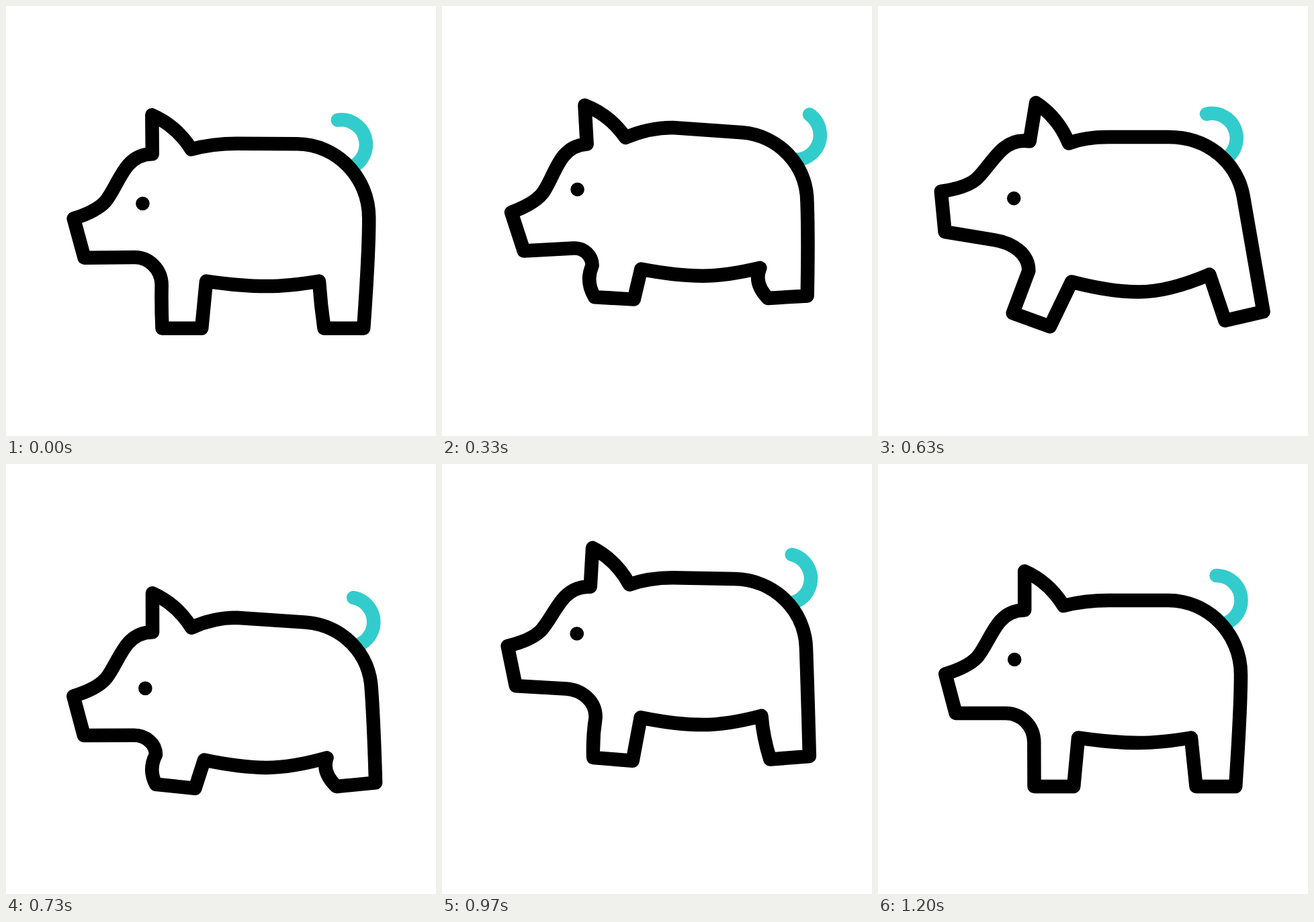
An HTML page that plays this animation: 640x640 px, repeating every 1670 ms.

```html
<!DOCTYPE html>
<html lang="en">
<head>
<meta charset="utf-8">
<title>Jumping pig</title>
<style>
  html, body { margin: 0; width: 100%; height: 100%; overflow: hidden; background: #fff; }
  svg { display: block; width: 100%; height: 100%; }
  path { fill: none; stroke-width: 20.5; stroke-linecap: round; stroke-linejoin: round; }
  #tail { stroke: #33cccc; }
  #body { stroke: #000; fill: #fff; }
</style>
</head>
<body>
<svg viewBox="0 0 640 640">
  <path id="tail" d="M-16.5-71A37 37 0 0 1 20.5-34A37 37 0 0 1 0-1"/>
  <path id="body"/>
  <circle id="eye" r="10.3"/>
</svg>
<script>
const LOOP = 1670, STEP = 1000 / 30;

// Turning points [step, value] of each movement; sine easing joins them.
const MOVES = {
  drop: [[-1, 0], [5.4, 40], [14.5, -67.5], [22.6, 34], [30, -35], [36, 0]],
  nod: [[-1, 0], [5.2, -8], [18.8, 9.4], [23.5, -3], [31.5, 5], [36, 0]],
  bend: [[-1, 0], [5.2, 16.7], [19, 0], [23, 13.5], [31.7, 0]],
  stride: [[5.2, 0], [19, 13], [23.5, 3], [31, 4.8], [36, 0]],
  wag: [[-2, 0], [2, -16], [9.5, 36], [14.5, -15], [18, -14], [25.5, 31], [32, 0]],
  gaze: [[0, 0], [13, -8], [19.5, 14.5], [27, -3], [36, 0]]
};

const rad = deg => deg * Math.PI / 180;
const el = id => document.getElementById(id);
const tail = el('tail'), body = el('body'), eye = el('eye');

function wave(points, n) {
  const i = points.findIndex(([t]) => t > n);
  if (i < 0) return points[points.length - 1][1];
  if (i === 0) return points[0][1];
  const [t0, a] = points[i - 1], [t1, b] = points[i];
  return a + (b - a) * (1 - Math.cos(Math.PI * (n - t0) / (t1 - t0))) / 2;
}

// Head coordinates are measured from the foot of the ear.
function headFrame({ drop, nod }) {
  const x0 = 218.2 + .8 * nod, y0 = 217.5 + drop - .88 * nod;
  const cos = Math.cos(rad(nod)), sin = Math.sin(rad(nod));
  return (x, y) => [x0 + x * cos - y * sin, y0 + x * sin + y * cos];
}

function outline(pose, at) {
  const { drop, nod, bend, stride } = pose;
  const reach = .75 * stride + .06 * stride * stride;
  const sole = ([x, y], a) => [x + 58.7 * Math.cos(rad(a)), y + 58.7 * Math.sin(rad(a))];
  const knee = (p, q, k) => [(p[0] + q[0]) / 2 - k, (p[1] + q[1]) / 2];

  const hipY = 203 + drop, shoulderY = hipY - .6 * bend;
  const hip = [432 + 1.2 * bend, hipY];
  const rump = [540 + .3 * stride + .2 * bend, hipY + 110 - 1.6 * stride];

  // Bent knees shorten the legs; hooves never sink below the ground.
  const hoofY = Math.min(480, 480 + drop - 2.4 * bend - .3 * stride);
  const hind = [473.5 + 3.3 * stride, hoofY], heel = sole(hind, -stride);
  const fore = [232.5 - 1.6 * reach, hoofY - .55 * reach], toe = sole(fore, reach);

  const groinY = 407.5 + drop - .25 * bend;
  const rear = [466 + 2.1 * stride, groinY];
  const front = [298 - .5 * reach, groinY + .55 * reach];
  const belly = [388, (rear[1] + front[1]) / 2 + 7.5 + stride];
  const toBelly = p => [belly[0] + .42 * (p[0] - belly[0]), belly[1]];

  const chest = [232.3 - .6 * bend - .4 * reach, 414 + drop - .9 * bend - .6 * reach];
  const jaw = at(-28, 153.5);
  const throat = at(-28 + .55 * (chest[0] - jaw[0]), 153.5);
  const lean = Math.max(0, heel[0] - rump[0]) / 170;
  const curve = .55 * (rump[1] - hipY);

  return [
    'M', at(-118, 95),
    'C', at(-100, 89.5), at(-82, 82), at(-71, 70.5),
    'C', at(-60, 59), at(-49, 30), at(-36, 16),
    'C', at(-27, 6), at(-15, 0), at(0, 0),
    'L', at(0, -58),
    'Q', at(36, -42), at(58, -6.5),
    'Q', [308, shoulderY], [343, shoulderY],
    'L', hip,
    'C', [hip[0] + .55 * (rump[0] - hip[0]), hipY + .36 * bend],
    [rump[0] - lean * curve, rump[1] - curve], rump,
    'Q', [rump[0] + lean * 50 + .15 * bend, rump[1] + 50], heel,
    'L', hind,
    'Q', knee(hind, rear, bend * 1.3), rear,
    'Q', toBelly(rear), belly,
    'Q', toBelly(front), front,
    'L', toe, 'L', fore,
    'Q', knee(fore, chest, bend), chest,
    'C', [chest[0], chest[1] - .55 * (chest[1] - jaw[1])], throat, jaw,
    'L', at(-102.5, 153.5), 'Z'
  ].join(' ');
}

function draw(ms) {
  const n = Math.floor((ms % LOOP + 5) / STEP);
  const pose = {};
  for (const name in MOVES) pose[name] = wave(MOVES[name], n);
  const { drop, wag, gaze } = pose;
  const at = headFrame(pose);
  const [ex, ey] = at(-15 + .4 * gaze, 73.5 + gaze);

  body.setAttribute('d', outline(pose, at));
  tail.setAttribute('transform', `translate(520 ${237 + drop + .2 * wag}) rotate(${wag})`);
  eye.setAttribute('cx', ex);
  eye.setAttribute('cy', ey);
}

const start = performance.now();
function tick() {
  draw(performance.now() - start);
  requestAnimationFrame(tick);
}
tick();
</script>
</body>
</html>
```
